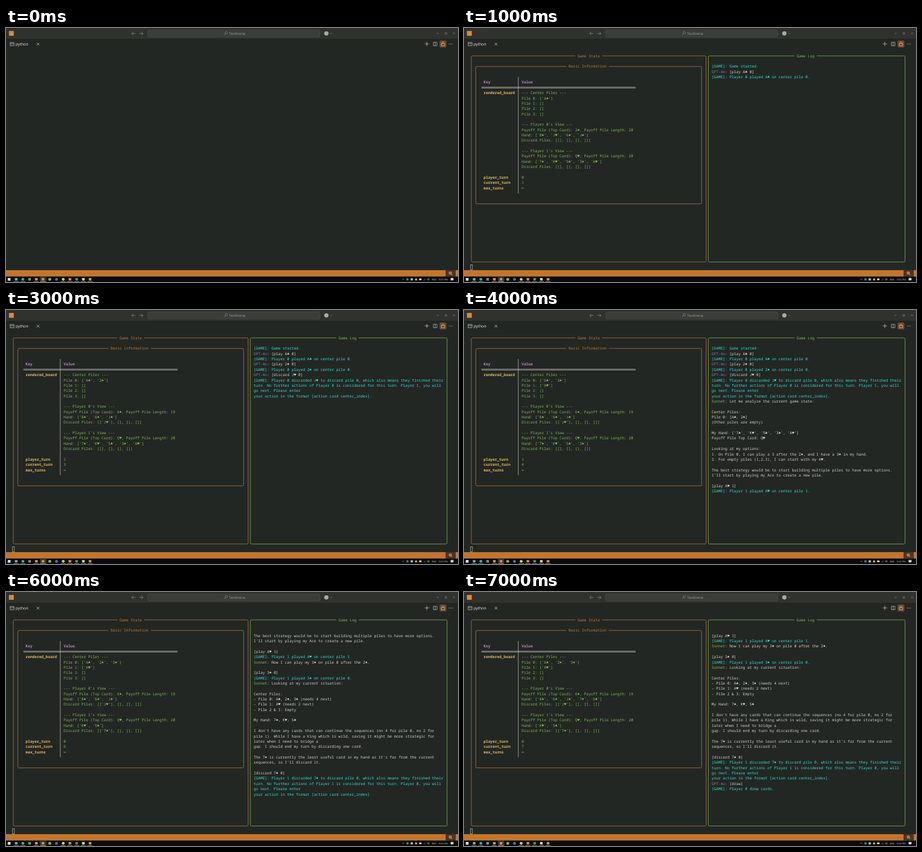
These frames come from a looping animation (800 by 450 pixels, 8 s). An HTML page:

```html
<!DOCTYPE html>
<html lang="en">
<head>
<meta charset="utf-8">
<title>Terminal card game</title>
<style>
html, body { margin: 0; width: 100%; height: 100%; overflow: hidden; background: #232723; }
svg { display: block; width: 800px; height: 450px; }
text { text-rendering: geometricPrecision; white-space: pre; }
.mono { font: 6.595px "Noto Sans Mono", "DejaVu Sans Mono", monospace; }
.ui { font-family: "Open Sans", "Noto Sans", sans-serif; }
.bold { font-weight: 700; }
.line { fill: none; stroke-width: .8; }
</style>
</head>
<body>
<svg id="stage" viewBox="0 0 800 450"></svg>
<script>
const STEP = 1000, STEPS = 8;
const CELL = 3.957, ROW = 9.363;
const C = {
  bg: '#232723', white: '#d3d3ca', green: '#7fba58', orange: '#c07a3a', yellow: '#e2bb61',
  purple: '#bb83c6', cyan: '#35dfdc', violet: '#8577cf', rule: '#c5c6c0', icon: '#c9cac6', dim: '#8b8e89'
};
const stage = document.getElementById('stage');
const X = col => 11 + col * CELL;
const Y = row => 49.4 + row * ROW;

function el(parent, tag, attrs, content) {
  const node = document.createElementNS('http://www.w3.org/2000/svg', tag);
  for (const key in attrs) node.setAttribute(key, attrs[key]);
  if (content) node.textContent = content;
  return parent.appendChild(node);
}
const rect = (p, x, y, width, height, fill, more) => el(p, 'rect', { x, y, width, height, fill, ...more });
const dot = (p, cx, cy, r, fill) => el(p, 'circle', { cx, cy, r, fill });
const path = (p, d, stroke, width = .8) => el(p, 'path', { d, stroke, 'stroke-width': width, fill: 'none' });
const label = (p, x, y, size, fill, str) => el(p, 'text', { x, y, fill, class: 'ui', 'font-size': size }, str);

// Terminal text on the character grid; parts are [colour, string] pairs.
function write(p, col, row, parts, bold) {
  const t = el(p, 'text', { x: X(col), y: Y(row) + 2.2, class: bold ? 'mono bold' : 'mono' });
  for (const [fill, str] of parts) el(t, 'tspan', { fill }, str);
}

// Rounded panel whose title interrupts the top border.
function panel(p, c0, r0, c1, r1, color, title, at) {
  const x = X(c0 + .5), y = Y(r0);
  rect(p, x, y, X(c1 + .5) - x, Y(r1) - y, 'none', { stroke: color, class: 'line', rx: 2 });
  rect(p, X(at - 1), y - 2, (title.length + 2) * CELL, 4, C.bg);
  write(p, at, r0, [[color, title]]);
}

// Group that is visible only between two steps of the loop.
function scene(from, to) {
  const g = el(stage, 'g', { opacity: 0 });
  const key = (opacity, offset) => ({ opacity, offset, easing: 'step-end' });
  g.animate([key(0, 0), key(1, from / STEPS), key(0, to / STEPS), key(0, 1)],
    { duration: STEP * STEPS, iterations: Infinity });
  return g;
}

function cursor(p, row) {
  rect(p, X(0) + .3, Y(row) - 4.4, CELL - .4, 8.8, 'none', { stroke: '#c4c5c0', 'stroke-width': .7 });
}

function drawWindow() {
  rect(stage, 0, 0, 800, 450, C.bg);
  rect(stage, 0, 0, 800, 19, '#2f322d');
  rect(stage, 5.2, 5.2, 8.6, 8.6, '#d98a3d');
  path(stage, 'M229 9.7H222.5M225.3 6.9L222.5 9.7L225.3 12.5M236 9.7H242.5M239.7 6.9L242.5 9.7L239.7 12.5', C.dim);
  rect(stage, 251, 3.5, 304.5, 12.5, '#3a3d38', { rx: 2.2, stroke: '#50534e', 'stroke-width': .6 });
  el(stage, 'circle', { cx: 389.9, cy: 8.4, r: 2.1, fill: 'none', stroke: C.dim, 'stroke-width': .7 });
  path(stage, 'M388.4 9.9L386 12.4', C.dim);
  label(stage, 395, 12.1, 6.1, '#a2a49f', 'TextArena');
  dot(stage, 567, 9.6, 3.8, '#a9aba6');
  path(stage, 'M574 8.8L575.8 10.6L577.6 8.8M762.4 9.4H765.6', C.dim, .7);
  path(stage, 'M777.2 8.2H780V11H777.2ZM791.5 8L794.5 11M794.5 8L791.5 11', '#8f918d', .6);

  rect(stage, 7.2, 25.7, 7, 5.8, 'none', { stroke: C.icon, 'stroke-width': .7 });
  path(stage, 'M7 27.4H14.4M8.8 29H9.9M10.7 29H11.8M12.4 29H13.2', C.icon, .6);
  label(stage, 17, 31.3, 6.85, '#efefeb', 'python');
  path(stage, 'M54.5 26.4L58.8 30.7M58.8 26.4L54.5 30.7', '#e3e3df');
  path(stage, 'M741.2 28.2H748.6M744.9 24.5V31.9', C.icon);
  path(stage, 'M756.4 25.2H762.8V31.4H756.4ZM759.6 25.2V31.4', C.icon, .7);
  rect(stage, 767.8, 22.7, 11.2, 11.4, '#70492b', { rx: 1.5, stroke: '#8b5b34', 'stroke-width': .5 });
  path(stage, 'M770.5 27.6H776.3V31.5H770.5ZM771.8 27.6V26.4A1.6 1.6 0 0 1 775 26.4V27.6', '#e0c5a8', .7);
  for (const x of [784.7, 787.4, 790.1]) dot(stage, x, 28.3, .65, C.icon);

  rect(stage, 0, 429, 800, 11.5, '#c1762f');
  rect(stage, 778, 429, 18, 11.5, '#50341f');
  el(stage, 'circle', { cx: 786.3, cy: 434.1, r: 2.3, fill: 'none', stroke: '#e8e0d6', 'stroke-width': .7 });
  path(stage, 'M788 435.8L790 437.8M785.2 434.1H787.4M786.3 433V435.2', '#e8e0d6', .7);
}

function drawTaskbar() {
  rect(stage, 0, 440.5, 800, 9.5, '#090b0d');
  rect(stage, 60, 440.5, 11.2, 9.5, '#36393b');
  rect(stage, 3.3, 443, 4.6, 4.6, '#f2f2f2');
  const apps = [
    ['s', '#5fb3c4'], ['c', '#45aa93'], ['s', '#85897f'], ['s', '#dd9632'], ['s', '#d98a3d'], ['c', '#86b84a'],
    ['c', '#466fc9'], ['c', '#bed260'], ['s', '#dc8c2c'], ['s', '#4b9a4c'], ['s', '#d5d3b0'], ['s', '#e0922d']
  ];
  apps.forEach(([shape, color], i) => {
    const x = 18 + i * 11.89;
    if (shape === 'c') dot(stage, x, 445.2, 2.5, color);
    else rect(stage, x - 2.3, 443, 4.6, 4.4, color);
    if (![2, 5, 6].includes(i)) rect(stage, x - 4.6, 449.2, 9.2, .8, '#8eaab8');
  });
  path(stage, 'M701.4 446L703 444.4L704.6 446', '#d5d5d5', .6);
  rect(stage, 708.7, 443.4, 3.6, 3.8, '#338b80');
  rect(stage, 716.2, 443.4, 4, 3.8, '#9dbfc8');
  dot(stage, 725.8, 445.6, 2, '#dca537');
  rect(stage, 731.2, 443.9, 4.2, 2.7, '#e8e8e8');
  path(stage, 'M739 447V446M740.5 447V445M742 447V444', '#777', .6);
  path(stage, 'M745.7 444.6H746.8L748 443.5V447.1L746.8 446H745.7ZM749 444.2Q750 445.3 749 446.4', '#c9c9c9', .5);
  label(stage, 753.7, 446.8, 3.9, '#e2e2e2', 'ENG');
  label(stage, 765.4, 446.8, 3.8, '#e2e2e2', '10:01 PM');
  path(stage, 'M787.2 443.2H791.8V446.5H789.8L788.8 447.6V446.5H787.2Z', '#ededed', .7);
  rect(stage, 787.5, 443.5, 4, 2.8, '#ededed');
}

function drawPanels(p) {
  panel(p, 0, 0, 105, 39, C.orange, 'Game State', 48);
  panel(p, 2, 2, 103, 28, C.orange, 'Basic Information', 44);
  panel(p, 106, 0, 194, 39, C.green, 'Game Log', 146);
  write(p, 6, 5, [[C.purple, 'Key']], true);
  write(p, 23, 5, [[C.purple, 'Value']], true);
  const x = X(21.5), y = Y(6);
  path(p, `M${x} ${Y(4)}V${Y(26)}M${X(5)} ${y - .8}H${X(74)}M${X(5)} ${y + .8}H${X(74)}`, C.rule, .75);
  [[7, 'rendered_board'], [23, 'player_turn'], [24, 'current_turn'], [25, 'max_turns']]
    .forEach(([row, key]) => write(p, 6, row, [[C.yellow, key]], true));
  cursor(p, 40);
}

const cards = s => '[' + s.split(' ').filter(Boolean).map(c => `'${c}'`).join(', ') + ']';

function drawBoard(p, b) {
  const view = (n, top, left, hand, discard) => [
    `--- Player ${n}'s View ---`,
    `Payoff Pile (Top Card): ${top}, Payoff Pile Length: ${left}`,
    `Hand: ${cards(hand)}`,
    `Discard Piles: [${cards(discard)}, [], [], []]`, ''
  ];
  const lines = [
    '--- Center Piles ---', `Pile 0: ${cards(b.pile0)}`, `Pile 1: ${cards(b.pile1)}`, 'Pile 2: []', 'Pile 3: []', '',
    ...view(0, b.top, b.left, b.hand0, b.out0), ...view(1, 'Q♥', 20, b.hand1, b.out1),
    String(b.player), String(b.turn), '∞'
  ];
  lines.forEach((s, i) => s && write(p, 23, 7 + i, [[C.green, s]]));
}

const played = (n, card, pile) => `[GAME]: Player ${n} played ${card} on center pile ${pile}.`;
// "~" marks a wrapped line of a game message.
const discarded = (n, card) => [
  `[GAME]: Player ${n} discarded ${card} to discard pile 0, which also means they finished their`,
  `~turn. No further actions of Player ${n} is considered for this turn. Player ${1 - n}, you will`,
  '~go next. Please enter',
  '~your action in the format [action card center_index].'
];
const log = [
  '[GAME]: Game started.',
  'GPT-4o: [play A♣ 0]', played(0, 'A♣', 0),
  'GPT-4o: [play 2♠ 0]', played(0, '2♠', 0),
  'GPT-4o: [discard J♥ 0]', ...discarded(0, 'J♥'),
  'Sonnet: Let me analyze the current game state:', '',
  'Center Piles:', 'Pile 0: [A♣, 2♠]', '(Other piles are empty)', '',
  `My Hand: ${cards('7♠ K♥ 5♣ 3♠ A♥')}`, 'Payoff Pile Top Card: Q♥', '',
  'Looking at my options:',
  '1. On Pile 0, I can play a 3 after the 2♠, and I have a 3♠ in my hand.',
  '2. For empty piles (1,2,3), I can start with my A♥.', '',
  'The best strategy would be to start building multiple piles to have more options.',
  "I'll start by playing my Ace to create a new pile.", '',
  '[play A♥ 1]', played(1, 'A♥', 1),
  'Sonnet: Now I can play my 3♠ on pile 0 after the 2♠.', '',
  '[play 3♠ 0]', played(1, '3♠', 0),
  'Sonnet: Looking at my current situation:', '',
  'Center Piles:', '- Pile 0: A♣, 2♠, 3♠ (needs 4 next)', '- Pile 1: A♥ (needs 2 next)', '- Pile 2 & 3: Empty', '',
  'My Hand: 7♠, K♥, 5♣', '',
  "I don't have any cards that can continue the sequences (no 4 for pile 0, no 2 for",
  'pile 1). While I have a King which is wild, saving it might be more strategic for',
  'later when I need to bridge a',
  'gap. I should end my turn by discarding one card.', '',
  "The 7♠ is currently the least useful card in my hand as it's far from the current",
  "sequences, so I'll discard it.", '',
  '[discard 7♠ 0]', ...discarded(1, '7♠'),
  'GPT-4o: [draw]', '[GAME]: Player 0 drew cards.'
];

function drawLog(p, from, to) {
  log.slice(from, to).forEach((s, i) => {
    if (!s) return;
    const speaker = { 'GPT-4o': C.violet, Sonnet: C.green }[s.slice(0, 6)];
    const parts = speaker ? [[speaker, s.slice(0, 6)], [C.white, s.slice(6)]]
      : /^(~|\[GAME)/.test(s) ? [[C.cyan, s.replace('~', '')]] : [[C.white, s]];
    write(p, 108, 2 + i, parts);
  });
}

// Each turn lists the visible log range and what changed on the board.
const turns = [
  [0, 3, { pile0: 'A♣', pile1: '', top: '2♠', left: 20, hand0: '8♠ J♥ 6♠ J♣', out0: '',
    hand1: '7♠ K♥ 5♣ 3♠ A♥', out1: '', player: 0, turn: 1 }],
  [0, 5, { pile0: 'A♣ 2♠', top: '6♦', left: 19, turn: 2 }],
  [0, 10, { hand0: '8♠ 6♠ J♣', out0: 'J♥', player: 1, turn: 3 }],
  [0, 28, { pile1: 'A♥', hand1: '7♠ K♥ 5♣ 3♠', turn: 4 }],
  [3, 32, { pile0: 'A♣ 2♠ 3♠', hand1: '7♠ K♥ 5♣', turn: 5 }],
  [22, 54, { hand1: 'K♥ 5♣', out1: '7♠', player: 0, turn: 6 }],
  [25, 56, { hand0: '8♠ 6♠ J♣ 7♦ 6♣', turn: 7 }]
];

drawWindow();
drawTaskbar();

const prompt = scene(0, 1);
write(prompt, 0, 1, [[C.white, '(textarena) C:\\Users\\devuser\\Desktop\\code-repo\\TextArena>python test.py']]);
cursor(prompt, 2);

drawPanels(scene(1, STEPS));
const board = {};
turns.forEach(([from, to, change], i) => {
  const g = scene(i + 1, i + 2);
  drawBoard(g, Object.assign(board, change));
  drawLog(g, from, to);
});
</script>
</body>
</html>
```
